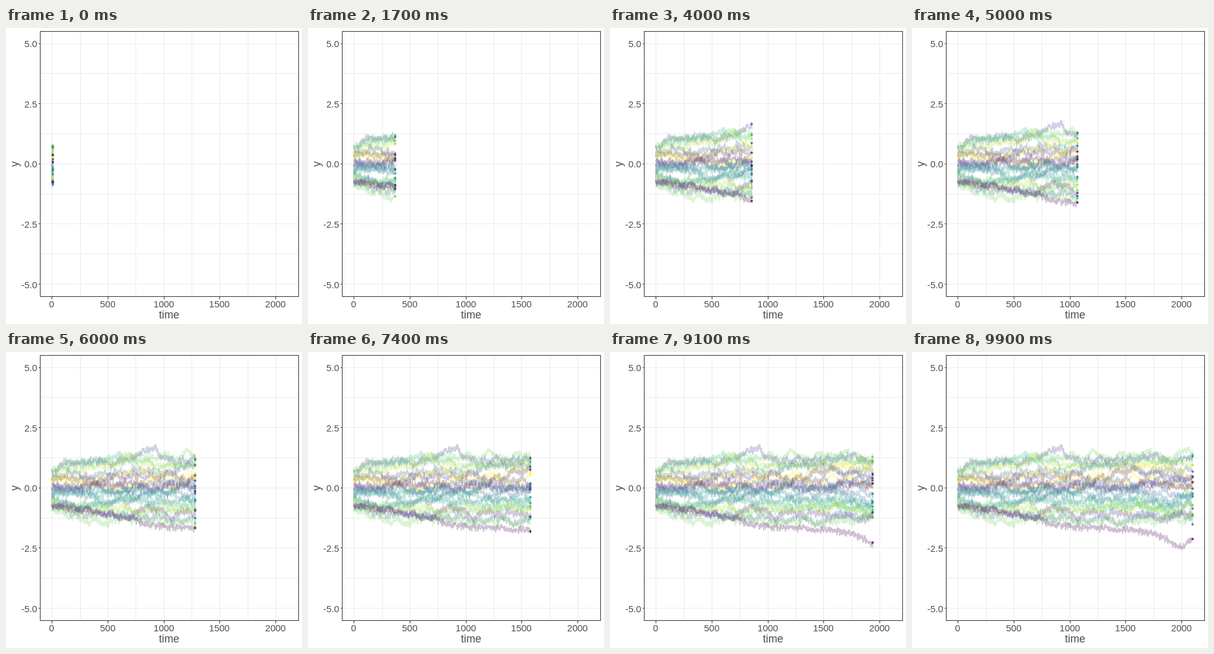
These frames come from a looping animation (480 px wide and 480 px high, 10 s). An HTML page:

```html
<!DOCTYPE html>
<html lang="en">
<head>
<meta charset="utf-8">
<title>Random walks over time</title>
<style>
html, body { margin: 0; width: 100%; height: 100%; overflow: hidden; background: #fff; }
svg { display: block; width: 480px; height: 480px; }
text { font-family: "Liberation Sans", Arial, sans-serif; font-size: 15px; fill: #4d4d4d; }
.title { font-size: 17.5px; text-anchor: middle; }
.grid, .tick, .frame { fill: none; shape-rendering: crispEdges; }
.grid { stroke: #ebebeb; }
.tick, .frame { stroke: #333; }
.walk { fill: none; stroke-width: 2; stroke-opacity: .25; stroke-linejoin: bevel; }
</style>
</head>
<body>
<svg id="stage" viewBox="0 0 480 480"></svg>
<script>
const LOOP = 10000, STEPS = 100;
const X0 = 74, X_END = 455, DX = 0.36;
const Y_MID = 222;

const PALETTE = {
  plum: '#440154', purple: '#482878', navy: '#3e4a89', blue: '#31688e', teal: '#26828e',
  sea: '#1f9e89', green: '#35b779', leaf: '#6dcd59', lime: '#b4de2c', yellow: '#fde725'
};

// Walk colours from the highest to the lowest level.
const COLOURS = ('leaf navy green lime blue yellow purple yellow navy plum navy ' +
  'teal blue sea teal green lime leaf purple blue leaf plum').split(' ');

// The lowest walk leaves the bundle late in the run.
const LOWEST = [[74, 250], [262, 287], [380, 286], [440, 314], [455, 300]];

function seeded(seed) {
  return () => {
    seed = (seed + 0x6d2b79f5) | 0;
    let t = Math.imul(seed ^ (seed >>> 15), 1 | seed);
    t = (t + Math.imul(t ^ (t >>> 7), 61 | t)) ^ t;
    return ((t ^ (t >>> 14)) >>> 0) / 4294967296;
  };
}

const random = seeded(2100);
const normal = () => (random() + random() + random() - 1.5) * 2;

function interpolate(points, x) {
  const i = Math.max(1, points.findIndex(p => p[0] >= x));
  const [[xa, ya], [xb, yb]] = [points[i - 1], points[i]];
  return ya + (yb - ya) * (x - xa) / (xb - xa);
}

// The bundle starts narrow and soon settles at its full spread.
const spread = x => 32 + 20 * (1 - Math.exp((X0 - x) / 45));

function makeWalk(colour, index) {
  const last = COLOURS.length - 1;
  const rank = 2 * index / (last - 1) - 1;
  const level = index === last
    ? x => interpolate(LOWEST, x)
    : x => Y_MID + rank * spread(x);
  const wander = index === last ? 0.4 : 0.95;
  const ys = [];
  let drift = 0;
  for (let x = X0; x <= X_END; x += DX) {
    drift = 0.988 * drift + wander * normal();
    ys.push(level(x) + drift + 3 * normal());
  }
  return { colour: PALETTE[colour], ys };
}

const walks = COLOURS.map(makeWalk);

const line = (cls, x1, y1, x2, y2) =>
  `<path class="${cls}" d="M${x1 + .5} ${y1 + .5}L${x2 + .5} ${y2 + .5}"/>`;
const label = (x, y, anchor, text) =>
  `<text x="${x}" y="${y}" text-anchor="${anchor}">${text}</text>`;

// Nine grid lines each way; every second one carries a tick and a label.
function axes() {
  let grid = '', marks = '';
  for (let i = 0; i < 9; i++) {
    const px = 74.7 + 45.35 * i, py = 25.1 + 48.8 * i;
    const x = Math.floor(px), y = Math.floor(py);
    grid += line('grid', x, 5, x, 435) + line('grid', 55, y, 474, y);
    if (i % 2) continue;
    marks += line('tick', x, 435, x, 439) + label(x, 452.5, 'middle', i * 250);
    marks += line('tick', 52, y, 55, y) +
      label(50.5, Math.round(py) + 6, 'end', (5 - i * 1.25).toFixed(1));
  }
  marks += '<text class="title" x="264.5" y="471">time</text>' +
    '<text class="title" transform="translate(19.5 220.5) rotate(-90)">y</text>';
  return { grid, marks };
}

const pathOf = ys =>
  'M' + ys.map((y, i) => `${(X0 + i * DX).toFixed(2)} ${y.toFixed(1)}`).join('L');

const { grid, marks } = axes();
document.getElementById('stage').innerHTML =
  `<defs><clipPath id="past"><rect id="reveal" x="73" y="0" height="480" width="0"/></clipPath></defs>
  <rect width="480" height="480" fill="#fff"/>${grid}
  <g clip-path="url(#past)">${walks.map(w =>
    `<path class="walk" stroke="${w.colour}" d="${pathOf(w.ys)}"/>`).join('')}</g>
  <g id="heads">${walks.map(w =>
    `<circle r="1.9" fill="${w.colour}" fill-opacity=".8"/>`).join('')}</g>
  <rect class="frame" x="55.5" y="5.5" width="419" height="430"/>${marks}`;

const reveal = document.getElementById('reveal');
const heads = [...document.getElementById('heads').children];
let shown = -1;

function draw(ms) {
  const step = Math.floor((ms % LOOP) / LOOP * STEPS);
  if (step === shown) return;
  shown = step;
  const x = Math.min(X_END, 76 + 3.845 * step);
  const sample = Math.floor((x - X0) / DX);
  reveal.setAttribute('width', x + 1 - 73);
  heads.forEach((head, i) => {
    head.setAttribute('cx', x);
    head.setAttribute('cy', walks[i].ys[sample].toFixed(1));
  });
}

function tick() {
  draw(performance.now());
  requestAnimationFrame(tick);
}
tick();
</script>
</body>
</html>
```
